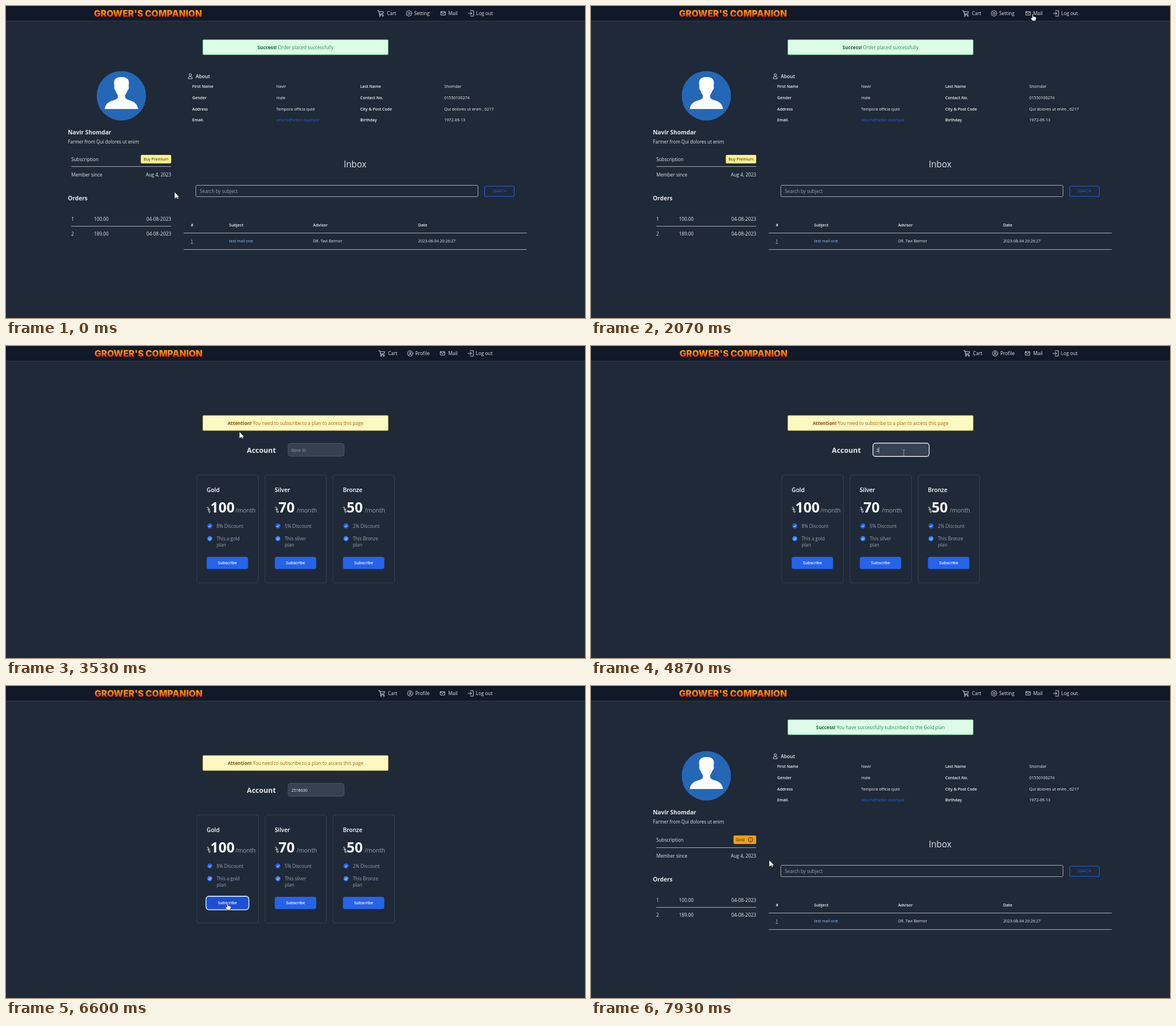
These frames come from a looping animation (1020 px wide and 549 px high, 8 s). An HTML page:

```html
<!DOCTYPE html>
<html lang="en">
<head>
<meta charset="utf-8">
<title>Account pages</title>
<style>
html, body { margin: 0; width: 100%; height: 100%; overflow: hidden; background: #1f2937; }
svg { display: block; width: 100vw; height: 100vh; font-family: 'Open Sans', 'Noto Sans', sans-serif; }
text { white-space: pre; }
</style>
</head>
<body>
<svg id="stage" viewBox="0 0 1020 549"></svg>
<script>
const LIGHT = '#e5e7eb', WHITE = '#fff', GRAY = '#9ca3af', BLUE = '#2563eb';

// Markup helpers
const text = (x, y, str, size = 8.25, fill = LIGHT, weight = 400, anchor = 'start', extra = '') =>
  `<text x="${x}" y="${y}" font-size="${size}" fill="${fill}" font-weight="${weight}" text-anchor="${anchor}" ${extra}>${str}</text>`;
const rect = (x, y, w, h, fill, stroke = 'none', r = 0, extra = '') =>
  `<rect x="${x}" y="${y}" width="${w}" height="${h}" fill="${fill}" stroke="${stroke}" rx="${r}" ${extra}/>`;
const line = (x1, x2, y) => `<path d="M${x1} ${y}H${x2}" stroke="${LIGHT}" stroke-width=".7"/>`;
const icon = (x, y, body, width = 0.9) =>
  `<g transform="translate(${x} ${y})" fill="none" stroke="${LIGHT}" stroke-width="${width}" stroke-linecap="round" stroke-linejoin="round">${body}</g>`;
const group = (id, body) => `<g id="${id}" display="none">${body}</g>`;

// Eight teeth, four corners each
const gearPoints = Array.from({ length: 32 }, (_, i) => {
  const r = i % 4 < 2 ? 5.2 : 4.1, a = (i - 0.5) * Math.PI / 16;
  return `${(r * Math.cos(a)).toFixed(2)},${(r * Math.sin(a)).toFixed(2)}`;
}).join(' ');

const icons = {
  cart: '<path d="M-5.5-4.8H-3.6L-1.9 2.4H4.4M-3.2-3H5.2L4.1.4-2.3.9"/><circle cx="-1.4" cy="4.4" r=".9"/><circle cx="3.7" cy="4.4" r=".9"/>',
  gear: `<circle r="1.8"/><polygon points="${gearPoints}"/>`,
  user: '<circle r="4.8"/><circle cy="-1.2" r="1.7"/><path d="M-3 3.4Q-2.4 1.4 0 1.4T3 3.4"/>',
  mail: '<rect x="-4" y="-3" width="8" height="6" rx=".5"/><path d="M-3.8-2.6 0 .6 3.8-2.6"/>',
  exit: '<path d="M-1-4.8H4.5V4.8H-1M-5 0H1.3M-1.2-2.6 1.4 0-1.2 2.6"/>',
  person: '<circle cy="-2.3" r="2.1"/><path d="M-3.3 4.1V2.8Q-3.3.9-1.2.9H1.2Q3.3.9 3.3 2.8V4.1Z"/>'
};

function nav(x, label, labelIcon, shift) {
  return rect(0, 0, 1020, 26, '#111827') + rect(0, 26, 1020, 0.8, '#374151') +
    text(x, 18.8, "GROWER'S COMPANION", 15.6, 'url(#flame)', 900, 'start',
      'font-family="Inter, sans-serif" stroke="#7a1608" stroke-width=".4"') +
    icon(660 + shift, 13, icons.cart) + text(671 + shift, 16.3, 'Cart', 8.4) +
    icon(710 + shift, 13, icons[labelIcon], 0.8) + text(719 + shift, 16.3, label, 8.4) +
    icon(770 - shift / 2, 13, icons.mail) + text(779, 16.3, 'Mail', 8.4) +
    icon(819.3 - shift / 4, 13, icons.exit) + text(828.3 - shift / 4, 16.3, 'Log out', 8.4);
}

const alertBox = (y, fill, edge, strong, color, lead, rest) =>
  rect(346.8, y + 0.3, 326.4, 26.5, fill, edge, 1.5, 'stroke-width=".6"') +
  text(510, y + 16.8, `<tspan font-weight="700" fill="${strong}">${lead}</tspan> ${rest}`, 8.25, color, 400, 'middle');

function avatar() {
  return '<circle cx="203.2" cy="158" r="43.5" fill="#2567b7"/>' +
    '<path d="M191 141C189 130 192 125 203.500 125S218 130 216 141L216.500 143Q216 148 214 148.500 212.500 154 210 156.500V161Q211 164 218 166 232 170 232.500 181.800H174Q174.500 170 189 166 196 164 197 161V156.500Q194 154 193 148.500 191 148 190.500 143Z" fill="#fff"/>' +
    '<path d="M174 181.800H232.500" stroke="#17406f" stroke-width=".7"/>';
}

function profile(message, gold) {
  const dy = gold ? 2 : 0;
  const field = (x, y, name, value, color = '#f3f4f6') =>
    text(x, y, name, 7.1, '#f3f4f6', 600) + text(x + 148, y, value, 7.1, color, 500);
  const order = (y, n, sum) => text(115, y, n) + text(155, y, sum) + text(291, y, '04-08-2023', 8.4, LIGHT, 400, 'end');
  const badge = gold
    ? rect(251, 263, 40, 15, '#f59e0b', 'none', 2) + text(255, 273.2, 'Gold', 7.1, '#1f2937', 500) +
      '<g fill="none" stroke="#1f2937" stroke-width=".9"><circle cx="281" cy="270.500" r="4"/><path d="M281 270v2.600M281 268.200v.8"/></g>'
    : rect(237.5, 262, 53.5, 15, '#fef08a', 'none', 2) + text(264.2, 272.3, 'Buy Premium', 7, '#1f2937', 500, 'middle');
  return nav(155, 'Setting', 'gear', 0) +
    alertBox(59, '#dcfce7', '#4ade80', '#166534', '#2f8a50', 'Success!', message) +
    avatar() +
    text(109, 225.5, 'Navir Shomdar', 10.2, LIGHT, 700) +
    text(109, 242, 'Farmer from Qui dolores ut enim', 8.15) +
    text(115, 273 + dy / 2, 'Subscription') + badge + line(115, 291, 282.5 + dy) +
    text(115, 299.7 + dy, 'Member since') + text(291, 299.7 + dy, 'Aug 4, 2023', 8.25, LIGHT, 400, 'end') +
    text(109, 341.6 + dy, 'Orders', 10.2, LIGHT, 700) +
    order(377.8 + dy, 1, '100.00') + line(115, 291, 387.5 + dy) + order(404.3 + dy, 2, '189.00') +
    icon(324.6, 123.5, icons.person) + text(334.3, 126.6, 'About', 8.6, LIGHT, 600) +
    field(328, 144.4, 'First Name', 'Navir') + field(624, 144.4, 'Last Name', 'Shomdar') +
    field(328, 164, 'Gender', 'male') + field(624, 164, 'Contact No.', '01550100274') +
    field(328, 183.6, 'Address', 'Tempora officia quid') + field(624, 183.6, 'City &amp; Post Code', 'Qui dolores ut enim , 6217') +
    field(328, 203.3, 'Email.', 'velumi@letter.example', BLUE) + field(624, 203.3, 'Birthday', '1972-09-13') +
    text(615, 283.6, 'Inbox', 15.4, LIGHT, 400, 'middle') +
    rect(334.5, 315.5, 497, 20, 'none', LIGHT, 2, 'stroke-width=".7"') + text(341.3, 328.7, 'Search by subject', 8.25, GRAY) +
    rect(843.3, 317, 52, 18, 'none', BLUE, 2, 'stroke-width="1.1"') + text(869.2, 328.3, 'SEARCH', 6.5, BLUE, 500, 'middle') +
    [[325.5, '#'], [393, 'Subject'], [541, 'Advisor'], [726, 'Date']]
      .map(([x, head]) => text(x, 387.6, head, 7.1, '#f3f4f6', 600)).join('') +
    line(313, 917.5, 399.5) + line(313, 917.5, 428.5) +
    text(325.3, 416.4, 1, 7.1, LIGHT, 400, 'start', 'text-decoration="underline"') +
    text(393, 416.4, 'test mail one', 7, '#93c5fd') +
    text(541, 416.4, 'DR. Tavi Belmor', 7, LIGHT) +
    text(726, 416.4, '2023-08-04 20:26:27', 7, LIGHT);
}

function card(x, name, price, off, note, monthX) {
  const tick = (y, color) => `<circle cx="${x + 23}" cy="${y}" r="4.400" fill="${color}"/>` +
    `<path d="M${x + 21} ${y + 0.2}l1.500 1.400 2.600-3" fill="none" stroke="#fff"/>`;
  const taka = `<path d="M${x + 18.2} 284.800q.3-1.800 1.500-1.400t1.200 2.200v4.600q0 3 1.600 3 1.500-.1 1-2.600-.2-1.200-1.400-.9M${x + 18.6} 287.300h4.800" fill="none" stroke="#fff" stroke-width=".9"/>`;
  return rect(x + 0.2, 227, 108.3, 190, 'none', '#364152', 4) +
    text(x + 17.5, 256.7, name, 10.2, WHITE, 600) + taka +
    text(x + 24, 293, price, 25, WHITE, 900, 'start', `font-family="'Noto Sans', 'Open Sans', sans-serif"`) +
    text(x + monthX, 293, '/month', 10.3, GRAY) +
    tick(316.7, BLUE) + text(x + 35, 319.8, off + '% Discount', 8.2, GRAY) +
    tick(339, '#3b82f6') + text(x + 35, 342.2, 'This ' + note, 8.2, GRAY) + text(x + 35, 353, 'plan', 8.2, GRAY) +
    rect(x + 17.5, 371, 73, 21.5, BLUE, 'none', 4, `id="buy${name}"`) +
    text(x + 54, 384.2, 'Subscribe', 7.15, WHITE, 600, 'middle');
}

const plans = () => nav(156, 'Profile', 'user', 2) +
  alertBox(122, '#fef9c3', '#facc15', '#854d0e', '#a16207', 'Attention!', 'You need to subscribe to a plan to access this page') +
  text(424.3, 188, 'Account', 12.5, LIGHT, 700) +
  rect(497, 171.3, 98.5, 22.7, '#374151', '#4b5563', 4) +
  group('fieldRing', rect(496.7, 170.9, 99, 23.4, 'none', WHITE, 4.5, 'stroke-width="1.200"')) +
  text(502.7, 185.5, '', 7.1, GRAY, 500, 'start', 'id="entry"') +
  group('caret', '<path d="M0 178.500v9" stroke="#fff" stroke-width=".7"/>') +
  group('buyRing', rect(352.6, 370.1, 75, 23.4, 'none', '#bfdbfe', 5, 'stroke-width="2"')) +
  card(336, 'Gold', 100, 8, 'a gold', 68) +
  card(456, 'Silver', 70, 5, 'silver', 56) +
  card(576, 'Bronze', 50, 2, 'Bronze', 56);

const cursors =
  group('arrow', '<path d="M0-.4V11L2.600 9 8 8Z" fill="#fff" stroke="#111827" stroke-width=".3"/><path d="M3.200 8.800 6 8.300 6.800 10.600 4.700 11.600Z" fill="#d8b078"/>') +
  group('hand', '<path d="M-.9.9Q-.8 0 0 0T.9.9V4.300L5.200 5.300Q6.500 5.700 6.300 7L5.700 9.800 4.800 12H-.3L-2.900 8.500Q-3.700 7.200-2.800 6.800-1.900 6.600-.9 7.700Z" fill="#fff" stroke="#111827" stroke-width=".6"/>') +
  group('beam', '<path d="M-2.300-5.300H-.6L0-4.800.6-5.300H2.300M0-4.800V4.800M-2.300 5.300H-.6L0 4.800.6 5.300H2.300" fill="none" stroke="#b9a78b" stroke-width=".8"/>');

stage.innerHTML =
  `<defs><linearGradient id="flame" x2="0" y2="1"><stop offset=".2" stop-color="#ffb000"/><stop offset=".55" stop-color="#f57c0a"/><stop offset=".85" stop-color="#dc1c0c"/></linearGradient></defs>` +
  group('page0', profile('Order placed successfully', false)) +
  group('page1', plans()) +
  group('page2', profile('You have successfully subscribed to the Gold plan', true)) +
  group('status', rect(0, 538, 62, 11, '#35363a', 'none', 1) + text(3, 545.8, '', 5.6, '#bdc1c6', 400, 'start', 'id="statusText"')) +
  `<g id="pointer">${cursors}</g>`;

const el = id => document.getElementById(id);
const show = (id, on) => el(id).setAttribute('display', on ? 'inline' : 'none');

// Pointer stops: time, x, y
const stops = [
  [130, 297, 328], [1000, 717, 35], [1200, 720, 36], [1870, 778, 14], [2800, 778, 14],
  [3670, 399, 156], [3930, 399, 156], [4670, 551, 188], [5270, 551, 188], [5670, 532, 209],
  [6270, 390, 382], [7670, 390, 382], [7930, 314, 307]
];
const ease = u => u * u * u * (u * (6 * u - 15) + 10);

function pointerAt(t) {
  const next = stops.findIndex(s => s[0] > t);
  if (next === 0) return stops[0].slice(1);
  if (next < 0) return stops[stops.length - 1].slice(1);
  const [t0, x0, y0] = stops[next - 1], [t1, x1, y1] = stops[next];
  const k = ease((t - t0) / (t1 - t0));
  return [x0 + (x1 - x0) * k, y0 + (y1 - y0) * k];
}

const ID = '2518630', TYPE_START = 4870, KEY_GAP = 125;

function draw(t) {
  const page = t < 2470 ? 0 : t < 7070 ? 1 : 2;
  for (let i = 0; i < 3; i++) show('page' + i, i === page);

  const [x, y] = pointerAt(t);
  const over = (left, top, right, bottom) => x >= left && x <= right && y >= top && y <= bottom;
  const onMail = over(764, 8, 796, 20);
  const onBuy = page === 1 && over(353, 371, 427, 393);
  const kind = onMail || onBuy ? 'hand' : page === 1 && over(497, 171, 596, 194) ? 'beam' : 'arrow';
  for (const id of ['arrow', 'hand', 'beam']) show(id, id === kind);
  pointer.setAttribute('transform', `translate(${x} ${y})`);

  const typed = t < TYPE_START ? 0 : Math.min(ID.length, 1 + Math.floor((t - TYPE_START) / KEY_GAP));
  const entry = el('entry');
  entry.textContent = typed ? ID.slice(0, typed) : 'Bank ID';
  entry.setAttribute('fill', typed ? WHITE : GRAY);
  show('fieldRing', t >= 4600 && t < 6470);
  show('caret', t >= 4600 && t < 6130);
  el('caret').setAttribute('transform', `translate(${503 + typed * 4.06} 0)`);

  el('buyGold').setAttribute('fill', onBuy ? '#1d4ed8' : BLUE);
  show('buyRing', t >= 6470);

  const waiting = t >= 1930 && t < 2070 || t >= 6530 && t < 6600;
  show('status', waiting || onMail && t < 1930);
  el('statusText').textContent = waiting ? 'Waiting for localhost...' : 'localhost:8000/mail';
}

const started = performance.now();
function tick() {
  const t = (performance.now() - started) % 8000;
  const step = Math.floor((t + 5) * 0.015) % 120;
  draw(Math.round(step / 0.15) * 10);
  requestAnimationFrame(tick);
}
tick();
</script>
</body>
</html>
```
